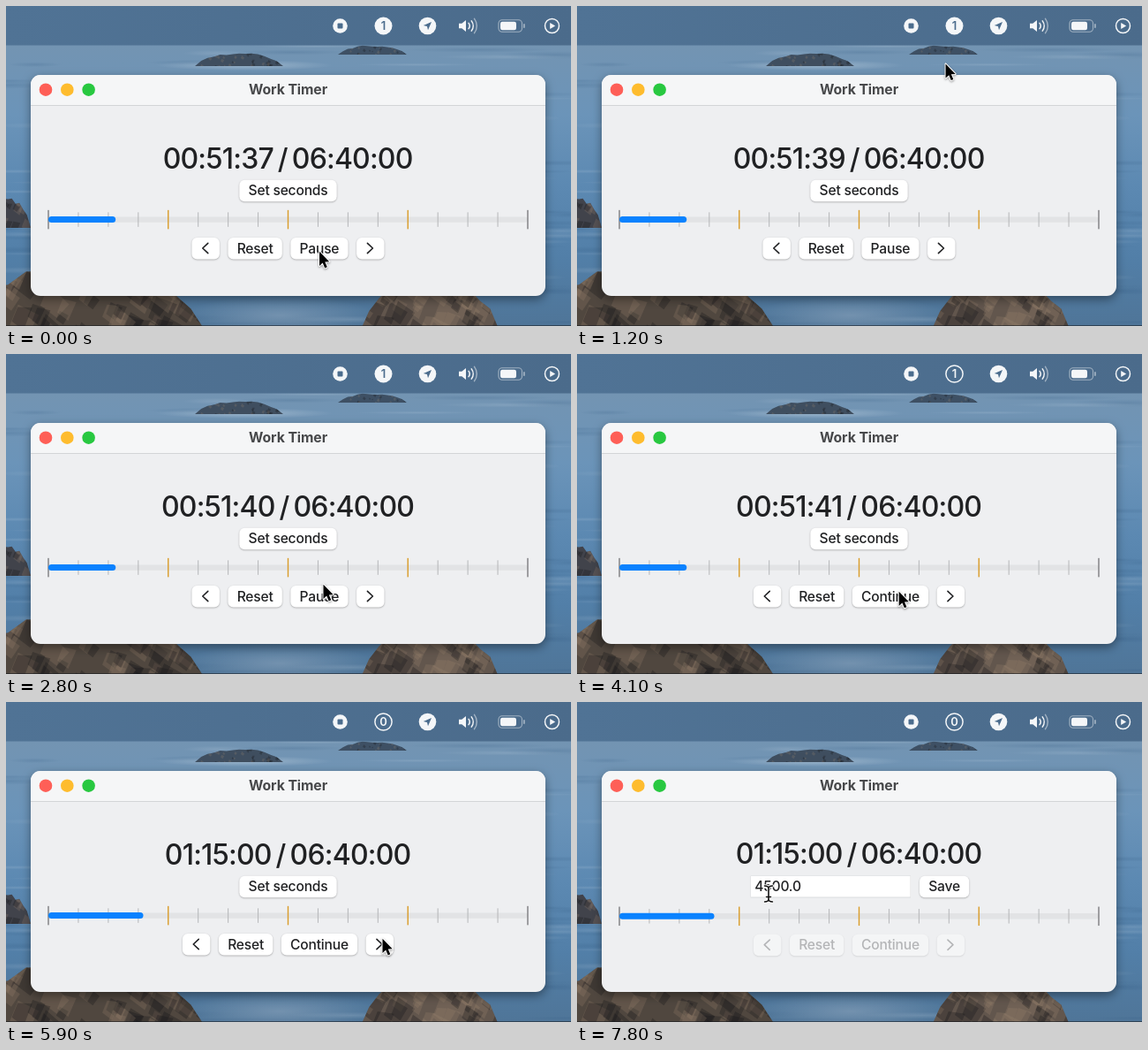
Recreate the animation shown at these times as an HTML page with a canvas. Size 640 by 362 pixels, loop 8000 ms.

```html
<!DOCTYPE html>
<html lang="en">
<head>
<meta charset="utf-8">
<title>Work Timer</title>
<style>
html, body { margin: 0; width: 100%; height: 100%; overflow: hidden; background: #567fa5; }
canvas { display: block; width: 640px; height: 362px; }
</style>
</head>
<body>
<canvas id="stage" width="640" height="362"></canvas>
<script>
const W = 640, H = 362, MID = 319.5;
const LOOP = 8000, STEP = 100, TOTAL = 24000, GOAL = 4500;
const PAUSE = 3600, SKIP = 5300, EDIT = 7000;
const FONT = 'Inter, "Open Sans", sans-serif';
const INK = '#202123', WHITE = '#f4f6f8', FAINT = 'rgba(244,246,248,.5)', BAR_INK = '#4b6c8d';

const stage = document.getElementById('stage').getContext('2d');
let ctx = stage;

const clamp = v => Math.max(0, Math.min(1, v));
const smooth = v => v * v * (3 - 2 * v);
const ease = (t, from, to) => smooth(clamp((t - from) / (to - from)));
const two = n => String(Math.floor(n)).padStart(2, '0');
const clock = s => [s / 3600, s / 60 % 60, s % 60].map(two).join(':');

function seeded(seed) {
  return () => (seed = (seed * 16807) % 2147483647) / 2147483647;
}

// Each glide leads from the place before it to x, y.
const ARROW = [
  { from: 700, to: 1370, x: 429, y: 24 },
  { from: 2000, to: 2750, x: 359, y: 260 },
  { from: 2900, to: 3400, x: 357, y: 268 },
  { from: 4000, to: 4500, x: 426, y: 267 },
  { from: 6000, to: 6900, x: 347, y: 205 }
];
const BEAM = [
  { from: 7300, to: 7500, x: 217, y: 235 },
  { from: 7600, to: 7800, x: 217, y: 217 }
];

function glide(x, y, moves, t) {
  for (const m of moves) {
    const p = ease(t, m.from, m.to);
    x += (m.x - x) * p;
    y += (m.y - y) * p;
  }
  return [x, y];
}

function trace(...points) {
  ctx.beginPath();
  for (const [x, y] of points) ctx.lineTo(x, y);
}

function fill(color) {
  ctx.fillStyle = color;
  ctx.fill();
}

function stroke(color, width) {
  ctx.lineCap = ctx.lineJoin = 'round';
  ctx.lineWidth = width;
  ctx.strokeStyle = color;
  ctx.stroke();
}

function rounded(x, y, w, h, r) {
  ctx.beginPath();
  ctx.roundRect(x, y, w, h, r);
}

function box(x, y, w, h, r, color) {
  rounded(x, y, w, h, r);
  fill(color);
}

function circle(x, y, r) {
  ctx.beginPath();
  ctx.arc(x, y, r, 0, Math.PI * 2);
}

function disc(x, y, r, color) {
  circle(x, y, r);
  fill(color);
}

function ring(x, y, r) {
  circle(x, y, r);
  stroke(WHITE, 1.5);
}

function shadow(alpha, blur, dy) {
  ctx.shadowColor = `rgba(0,0,0,${alpha})`;
  ctx.shadowBlur = blur;
  ctx.shadowOffsetY = dy;
}

function setFont(font, spacing = 0, wordSpacing = 0) {
  ctx.font = font + ' ' + FONT;
  ctx.letterSpacing = spacing + 'px';
  ctx.wordSpacing = wordSpacing + 'px';
}

function write(str, x, y, color, align = 'center') {
  ctx.textAlign = align;
  ctx.fillStyle = color;
  ctx.fillText(str, x, y);
}

function haze(x, y, rx, ry, rgb, alpha) {
  ctx.save();
  ctx.translate(x, y);
  ctx.scale(rx, ry);
  const g = ctx.createRadialGradient(0, 0, 0, 0, 0, 1);
  g.addColorStop(0, `rgba(${rgb},${alpha})`);
  g.addColorStop(1, `rgba(${rgb},0)`);
  disc(0, 0, 1, g);
  ctx.restore();
}

// A jagged mound standing on y = base, broken up by light and dark shards.
function rock(x, base, w, h, color, seed) {
  const rnd = seeded(seed), n = 14;
  const ridge = Array.from({ length: n + 1 }, (_, i) =>
    [x + w * i / n, base - h * Math.sin(Math.PI * i / n) ** 0.6 * (0.82 + 0.18 * rnd())]);
  ctx.save();
  trace(...ridge);
  fill(color);
  ctx.clip();
  for (let i = 0; i < w / 3; i++) {
    const sx = x + w * rnd(), sy = base - h * rnd(), s = h * (0.08 + 0.2 * rnd());
    trace([sx, sy], [sx + s, sy + s * rnd()], [sx + s * 0.4, sy + s * 1.6], [sx - s * 0.4, sy + s]);
    fill(i % 2 ? 'rgba(160,138,116,.22)' : 'rgba(20,20,26,.3)');
  }
  ctx.restore();
}

function drawSea() {
  const g = ctx.createLinearGradient(0, 44, 0, H);
  ['#7394b2', '#6b94b9', '#5c89b2', '#527fa8', '#4f7598'].forEach((c, i) => g.addColorStop(i / 4, c));
  ctx.fillStyle = g;
  ctx.fillRect(0, 0, W, H);

  const rnd = seeded(77);
  for (let i = 0; i < 110; i++) {
    haze(W * rnd(), 44 + 318 * rnd(), 30 + 70 * rnd(), 1.5 + 3 * rnd(),
      i % 2 ? '190,208,224' : '50,90,130', 0.2);
  }
  haze(270, 67, 100, 6, '185,204,220', 0.6);
  haze(310, 350, 110, 22, '150,172,194', 0.5);

  rock(214, 68, 100, 16, '#3f4e5f', 5);
  rock(376, 55, 78, 11, '#3e5064', 9);
  rock(-32, 251, 60, 38, '#41434b', 21);
  rock(-60, 374, 290, 92, '#50473f', 33);
  rock(400, 370, 160, 72, '#62564d', 47);
  ctx.fillStyle = 'rgba(20,25,30,.55)';
  ctx.fillRect(0, H - 1, W, 1);
}

function drawMenuBar() {
  const g = ctx.createLinearGradient(0, 0, W, 0);
  g.addColorStop(0, '#507395');
  g.addColorStop(1, '#4b6b8b');
  ctx.fillStyle = g;
  ctx.fillRect(0, 0, W, 44.5);
  const y = 22.5;

  disc(378.5, y, 8.3, WHITE);
  box(375.5, y - 3, 6, 6, 1, BAR_INK);

  disc(477.5, y, 9.8, WHITE);
  trace([482, 18], [478, 27.2], [477, 23], [472.8, 22]);
  fill(BAR_INK);

  trace([513, y - 2.7], [516.3, y - 2.7], [521, y - 6.6], [521, y + 6.6], [516.3, y + 2.7], [513, y + 2.7]);
  fill(WHITE);
  for (let i = 1; i <= 3; i++) {
    ctx.beginPath();
    ctx.arc(520, y, 1 + i * 4.1, -0.66, 0.66);
    stroke(i < 3 ? WHITE : FAINT, 1.5);
  }

  rounded(558, y - 6.8, 26.5, 13.6, 4);
  stroke(FAINT, 1.1);
  box(560, y - 4.7, 18, 9.4, 2.2, WHITE);
  box(586, y - 2.4, 1.8, 4.8, 1, FAINT);

  ring(618.5, y, 8);
  trace([616.2, y - 3.6], [616.2, y + 3.6], [622.2, y]);
  fill(WHITE);
}

function drawWindow() {
  shadow(0.4, 11, 4);
  box(28, 78, 583, 250, 11, '#eeeff1');
  shadow(0, 0, 0);
  box(28, 78, 583, 34, [11, 11, 0, 0], '#f5f6f7');
  ctx.fillStyle = '#d3d5d7';
  ctx.fillRect(28, 112, 583, 1);
  ['#fe5f57', '#febc2e', '#28c840'].forEach((c, i) => disc(45 + i * 24.3, 94.7, 7.3, c));
  setFont('700 15.8px', -0.1);
  write('Work Timer', MID, 100, '#47484a');
}

function backdrop() {
  const sheet = document.createElement('canvas');
  sheet.width = W;
  sheet.height = H;
  ctx = sheet.getContext('2d');
  drawSea();
  drawMenuBar();
  drawWindow();
  ctx = stage;
  return sheet;
}

function drawCounter(count, running) {
  if (running) disc(427.5, 22.5, 10, WHITE);
  else ring(427.5, 22.5, 9.6);
  setFont('600 13px');
  write(count, 427.5, 27.2, running ? BAR_INK : WHITE);
}

const labelFont = () => setFont('450 15.6px', -0.2);

function widthOf(label) {
  if (label.length === 1) return 31.5;
  labelFont();
  return ctx.measureText(label).width + 20.5;
}

function button(label, x, y, off) {
  const w = widthOf(label), color = off ? '#b4b5b7' : INK;
  shadow(off ? 0.12 : 0.3, 2, 0.8);
  box(x, y, w, 24.5, 6, off ? '#f4f5f6' : '#fff');
  shadow(0, 0, 0);
  if (label.length > 1) {
    labelFont();
    return write(label, x + w / 2, y + 17.6, color);
  }
  const d = label === '<' ? 1 : -1, cx = x + w / 2 - 0.4, cy = y + 12;
  trace([cx + 3 * d, cy - 5.6], [cx - 3 * d, cy], [cx + 3 * d, cy + 5.6]);
  stroke(color, 1.6);
}

function buttonRow(labels, y, off) {
  const gap = 9.5;
  const total = labels.reduce((sum, s) => sum + widthOf(s) + gap, -gap);
  let x = MID - total / 2;
  for (const s of labels) {
    button(s, x, y, off);
    x += widthOf(s) + gap;
  }
}

function drawProgress(part, y) {
  box(48, y - 3.2, 543, 6.4, 3, '#e2e3e5');
  for (let i = 0; i <= 16; i++) {
    const end = i % 16 === 0, major = i % 4 === 0;
    const h = major ? 21.5 : 16.5, w = major ? 1.4 : 1;
    ctx.fillStyle = end ? '#7c7d7f' : major ? '#d99c28' : '#b6b7b9';
    ctx.fillRect(48 + i * 543 / 16 - w / 2, y - h / 2, w, h);
  }
  box(48, y - 3.5, 7 + part * 536, 7, 3.5, '#0a82ff');
}

function drawArrow(x, y) {
  ctx.save();
  ctx.translate(x, y);
  trace([0.5, 0.8], [0.5, 17], [4.2, 13.6], [6.7, 19.4], [9.3, 18.3], [6.8, 12.6], [11.7, 12.3]);
  ctx.closePath();
  shadow(0.4, 2.5, 1);
  stroke('#fff', 2);
  shadow(0, 0, 0);
  fill('#000');
  ctx.restore();
}

function drawBeam(x, y) {
  ctx.beginPath();
  for (const s of [-1, 1]) {
    ctx.moveTo(x - 4.5, y + 9 * s);
    ctx.quadraticCurveTo(x, y + 9 * s, x, y + 6 * s);
    ctx.quadraticCurveTo(x, y + 9 * s, x + 4.5, y + 9 * s);
  }
  ctx.moveTo(x, y - 7);
  ctx.lineTo(x, y + 7);
  ctx.moveTo(x - 2.5, y + 3.5);
  ctx.lineTo(x + 2.5, y + 3.5);
  stroke('#fff', 3.4);
  stroke('#111', 1.6);
}

function drawEditor() {
  box(196.5, 196.5, 181.5, 25, 0, '#dcdddf');
  box(197, 197, 180.5, 23.6, 0, '#fff');
  labelFont();
  write('4500.0', 201.3, 214.3, INK, 'left');
  button('Save', 388, 196.7);
}

function draw(t) {
  const running = t < PAUSE, skipped = t >= SKIP, editing = t >= EDIT;
  const worked = 3097 + Math.floor((Math.min(t, PAUSE) + 800) / 1000);
  const shown = worked + (GOAL - worked) * ease(t, SKIP - STEP, 5900);
  const dy = editing ? 0.7 : 0;

  ctx.drawImage(back, 0, 0);
  drawCounter(skipped ? '0' : '1', running);
  setFont('450 32px', -0.8, -2.8);
  write(clock(skipped ? GOAL : worked) + ' / ' + clock(TOTAL), MID - 0.4, 183.9 - dy, INK);

  if (editing) drawEditor();
  else button('Set seconds', MID - widthOf('Set seconds') / 2, 196.7);

  drawProgress(shown / TOTAL, 241.6 + dy);
  buttonRow(['<', 'Reset', running ? 'Pause' : 'Continue', '>'], 262 + dy, editing);

  if (editing) drawBeam(...glide(352, 214, BEAM, t));
  else drawArrow(...glide(354.5, 277, ARROW, t));
}

const back = backdrop();
const start = performance.now();
function frame() {
  const t = (performance.now() - start) % LOOP;
  draw(Math.floor(t / STEP) * STEP);
  requestAnimationFrame(frame);
}
frame();
</script>
</body>
</html>
```
